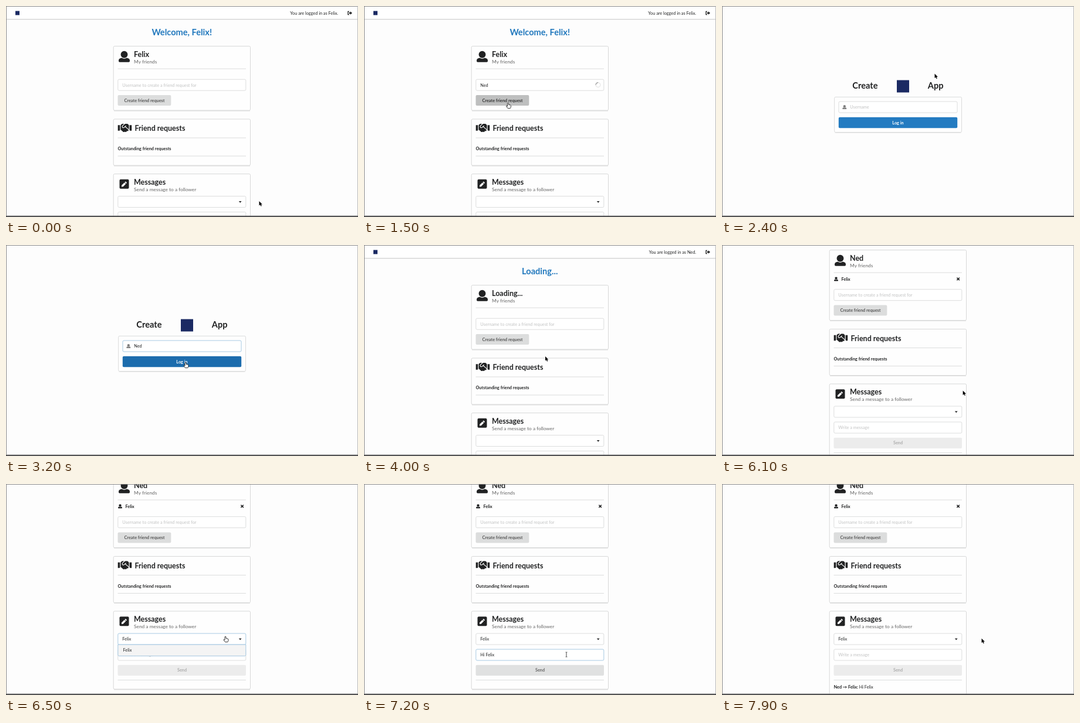
Animation, 600 px wide and 360 px high, one loop 8000 ms. Source, as an HTML page with a canvas:

```html
<!DOCTYPE html>
<html lang="en">
<head>
<meta charset="utf-8">
<title>Friends app</title>
<style>
  html, body { margin: 0; width: 100%; height: 100%; overflow: hidden; background: #fdfdfd; }
  canvas { display: block; }
</style>
</head>
<body>
<canvas id="stage" width="600" height="360"></canvas>
<script>
const ctx = document.getElementById('stage').getContext('2d');
const LOOP = 8000, TICK = 100;
const FRIEND = 'Felix', USER = 'Ned';
const INK = '#212223', GREY = '#666', FAINT = '#c2c3c3', LINE = '#dcdddd';
const BLUE = '#2178bd', FOCUS = '#9cc3df', NAVY = '#1b2a63';
const SMALL = 7.3, SUB = 8.35, HEAD = 12.5, TITLE = 14.6;
const ROW = 10.5;

const userIcon = new Path2D('M256 0A160 160 0 0 1 256 320A160 160 0 0 1 256 0ZM439 334L368 316Q256 390 144 316L73 334Q0 355 0 427V464Q0 512 48 512H464Q512 512 512 464V427Q512 355 439 334Z');
const cuffs = new Path2D('M0 128H96V352Q96 384 64 384H0ZM544 128H640V384H576Q544 384 544 352Z');
const rightHand = new Path2D('M435 64H349Q337 64 327 72L229 162Q208 190 227 219Q253 242 283 221L363 148Q380 140 386 158L359 195L512 322V128L457 73Z');
const leftHand = new Path2D('M289 64H205Q192 64 183 73L128 128V352H146L237 434Q290 470 327 424Q365 465 397 434L429 395Q460 415 480 395L490 380Q500 355 484 339L335 217L305 245Q245 285 203 241Q165 190 207 139Z');
const arrow = new Path2D('M0 0V7.6L1.8 6L3 8.7L4.3 8.1L3.1 5.6H5.4Z');
const hand = new Path2D('M-1 5V.7Q0 -.6 1 .7V3.5Q4.6 3.4 5 5L4.8 7.6L3.8 9.6H-.4L-3 6.2Q-3 4.8 -2 5.3L-1 6.3Z');

// tick, x, y, pointer shape
const pointerKeys = [
  [0, 431.5, 333, 'arrow'], [3, 330, 135, 'beam'], [6, 330, 135, 'beam'],
  [7, 285, 150, 'arrow'], [9, 245.5, 165, 'hand'], [18, 245.5, 165, 'hand'],
  [19, 330, 125, 'arrow'], [21, 586, 11, 'hand'], [22, 586, 11, 'hand'],
  [23, 490, 55, 'arrow'], [24, 362.5, 115.5, 'arrow'], [26, 300, 173, 'beam'],
  [31, 300, 173, 'beam'], [32, 306, 200, 'hand'], [33, 308, 222, 'arrow'],
  [34, 309, 202, 'hand'], [36, 309, 192, 'hand'], [37, 309, 190, 'arrow'],
  [45, 309, 190, 'arrow'], [49, 402, 254, 'hand'], [52, 402, 254, 'arrow'],
  [53, 408, 250, 'arrow'], [54, 465.5, 231, 'arrow'], [58, 465.5, 231, 'arrow'],
  [63, 374, 260, 'hand'], [67, 374, 260, 'hand'], [68, 345, 291, 'beam'],
  [72, 345, 291, 'beam'], [74, 305, 315, 'hand'], [77, 305, 315, 'hand'],
  [78, 370, 292, 'arrow'], [79, 442.5, 263.5, 'arrow']
];

const between = (v, from, to) => v >= from && v < to;

function text(str, x, y, size, color = INK, weight = 400, align = 'left') {
  ctx.font = `${weight} ${size}px Lato, sans-serif`;
  ctx.fillStyle = color;
  ctx.textAlign = align;
  ctx.fillText(str, x, y + size * 0.36);
}

const bold = (str, x, y, size, color = INK, align = 'left') => text(str, x, y, size, color, 700, align);

function box(x, y, w, h, fill, stroke, r = 2) {
  ctx.beginPath();
  ctx.roundRect(x, y, w, h, r);
  if (fill) { ctx.fillStyle = fill; ctx.fill(); }
  if (stroke) { ctx.strokeStyle = stroke; ctx.lineWidth = 0.9; ctx.stroke(); }
}

function rule(y) {
  ctx.fillStyle = LINE;
  ctx.fillRect(190.5, y - 0.5, 218.5, 1);
}

function icon(paths, x, y, scale, color = INK) {
  ctx.save();
  ctx.translate(x, y);
  ctx.scale(scale, scale);
  ctx.fillStyle = color;
  paths.forEach(p => ctx.fill(p));
  ctx.restore();
}

function poly(points, color) {
  ctx.beginPath();
  points.forEach(([x, y]) => ctx.lineTo(x, y));
  ctx.fillStyle = color;
  ctx.fill();
}

function strokeLine(points, color, width) {
  ctx.beginPath();
  points.forEach(([x, y], i) => i ? ctx.lineTo(x, y) : ctx.moveTo(x, y));
  ctx.strokeStyle = color;
  ctx.lineWidth = width;
  ctx.stroke();
}

function card(y, h) {
  ctx.fillStyle = '#e4e4e4';
  ctx.fillRect(184, y + h, 232, 1.5);
  box(183.2, y, 233.3, h, '#fefefe', '#d3d4d4');
}

function field(x, y, w, value, hint, focused, pad = 7.5) {
  box(x, y, w, 19, '#fff', focused ? FOCUS : '#d9dada');
  text(value || hint, x + pad, y + 9.7, SMALL, value ? INK : FAINT);
}

function spinner(x, y, time) {
  const start = time / 600 * Math.PI * 2;
  ctx.lineWidth = 1;
  [['#e2e2e2', 0, 7], ['#808080', start, start + 1.6]].forEach(([color, a, b]) => {
    ctx.beginPath();
    ctx.arc(x, y, 4, a, b);
    ctx.strokeStyle = color;
    ctx.stroke();
  });
}

function personRow(name, y) {
  icon([userIcon], 191, y - 3.7, 7 / 512);
  bold(name, 203.5, y, SMALL);
}

function navbar(name) {
  ctx.fillStyle = '#fff';
  ctx.fillRect(0, 0, 600, 22);
  ctx.fillStyle = '#d2d3d3';
  ctx.fillRect(0, 22, 600, 1);
  ctx.fillStyle = '#efefef';
  ctx.fillRect(0, 23, 600, 1);
  ctx.fillStyle = NAVY;
  ctx.fillRect(16, 8.5, 7, 7);
  text(`You are logged in as ${name}.`, 566, 12, SMALL, INK, 400, 'right');
  strokeLine([[585, 9.4], [582.9, 9.4], [582.9, 14.6], [585, 14.6]], INK, 1.2);
  ctx.fillStyle = INK;
  ctx.fillRect(584.6, 11, 2.6, 2);
  poly([[586.8, 9], [590, 12], [586.8, 15]], INK);
}

function profileCard(y, s) {
  const extra = s.friend ? ROW : 0;
  card(y, 109.5 + extra);
  icon([userIcon], 192, y + 8.2, 19 / 512);
  bold(s.heading, 218, y + 14, HEAD);
  text('My friends', 218, y + 26.5, SUB, GREY);
  rule(y + 38.5);
  if (s.friend) {
    personRow(FRIEND, y + 49.5);
    const cy = y + 49.3;
    strokeLine([[400.4, cy - 2.2], [404.8, cy + 2.2]], INK, 1.6);
    strokeLine([[400.4, cy + 2.2], [404.8, cy - 2.2]], INK, 1.6);
  }
  y += extra;
  field(190.8, y + 56.6, 218, s.request, 'Username to create a friend request for', s.requestFocus);
  if (s.requestBusy) spinner(399, y + 66, s.time);
  box(190.5, y + 83.3, 90.8, 18.2, s.requestHover ? '#bebfbf' : '#dcdddd');
  bold('Create friend request', 236, y + 92.4, SMALL, s.requestHover ? '#333' : '#555', 'center');
}

function requestsCard(y, pending) {
  const extra = pending ? ROW : 0;
  card(y, 79 + extra);
  icon([cuffs, leftHand, rightHand], 190.7, y + 5.6, 23.5 / 640);
  bold('Friend requests', 219.5, y + 15.7, HEAD);
  rule(y + 32);
  bold('Outstanding friend requests', 190.5, y + 50.7, SMALL);
  if (pending) {
    personRow(FRIEND, y + 63);
    icon([userIcon], 398.5, y + 60, 6 / 512);
    strokeLine([[405, y + 63], [408.5, y + 63]], INK, 1);
    strokeLine([[406.7, y + 61.2], [406.7, y + 64.8]], INK, 1);
  }
  rule(y + 63 + extra);
}

function pencilIcon(x, y) {
  box(x, y, 16, 16, INK, null, 2);
  ctx.save();
  ctx.translate(x + 3.4, y + 12.7);
  ctx.rotate(-Math.PI / 4);
  poly([[0, 0], [2.2, -1.7], [8.7, -1.7], [8.7, 1.7], [2.2, 1.7]], '#fff');
  box(9.4, -1.7, 2, 3.4, '#fff', null, 0.6);
  ctx.restore();
}

function messagesCard(y, s) {
  card(y, 133 + (s.sent ? ROW : 0));
  pencilIcon(193.5, y + 9.3);
  bold('Messages', 218, y + 13.5, HEAD);
  text('Send a message to a follower', 218, y + 26.2, SUB, GREY);
  field(190.8, y + 65, 218, s.message, 'Write a message', s.messageFocus);
  box(190.5, y + 91.8, 218.5, 18.2, s.sendHover ? '#cfd0d0' : s.message ? '#e0e1e1' : '#ececec');
  if (s.sendBusy) spinner(300, y + 101, s.time);
  else bold('Send', 300, y + 100.7, SMALL, s.message ? '#666' : '#adadad', 'center');
  rule(y + 117.5);
  if (s.sent) {
    const label = `${USER} → ${FRIEND}:`;
    bold(label, 190.5, y + 129.5, SMALL);
    const w = ctx.measureText(label + ' ').width;
    text(`Hi ${FRIEND}`, 190.5 + w, y + 129.5, SMALL);
  }
  field(190.8, y + 38, 218, s.receiver, '', s.receiverFocus);
  poly([[396.8, y + 46.6], [401.6, y + 46.6], [399.2, y + 49.2]], INK);
  if (s.menuOpen) {
    box(190.8, y + 57, 218, 19.4, '#f4f4f4', FOCUS, [0, 0, 2, 2]);
    text(FRIEND, 199.5, y + 66.7, SMALL);
  }
}

function mainPage(s) {
  ctx.save();
  ctx.translate(0, -s.scroll);
  navbar(s.login);
  bold(s.title, 299.7, 45, TITLE, BLUE, 'center');
  const friendShift = s.friend ? ROW : 0;
  profileCard(68.6, s);
  requestsCard(193 + friendShift, s.pending);
  messagesCard(286.5 + friendShift + (s.pending ? ROW : 0), s);
  ctx.restore();
}

function loginPage(k) {
  bold('Create', 222.3, 136, TITLE);
  bold('App', 350.8, 136, TITLE);
  ctx.fillStyle = NAVY;
  ctx.fillRect(298, 126.5, 21, 21);
  ctx.fillStyle = '#e4e4e4';
  ctx.fillRect(192.5, 215.5, 215, 1.2);
  box(191.7, 155.3, 216.8, 60.2, '#fefefe', '#d6d7d7');
  const typed = USER.slice(0, Math.max(0, k - 28));
  field(199, 163, 202, typed, 'Username', between(k, 27, 36), 19.3);
  icon([userIcon], 205.3, 169, 7 / 512, '#808080');
  const hover = k === 32 || between(k, 34, 37);
  box(198.8, 189.8, 202.4, 18.4, hover ? '#1c6cad' : '#237bc1');
  bold('Log in', 300, 199, SMALL, '#fff', 'center');
}

function stateAt(k, time) {
  const first = k < 23, loading = between(k, 37, 45);
  const greeting = `Hi ${FRIEND}`;
  return {
    time,
    login: first ? FRIEND : USER,
    title: loading ? 'Loading...' : `Welcome, ${first ? FRIEND : USER}!`,
    heading: loading ? 'Loading...' : first ? FRIEND : USER,
    request: k < 18 ? USER.slice(0, Math.max(0, k - 3)) : '',
    requestFocus: between(k, 3, 10),
    requestBusy: between(k, 11, 18),
    requestHover: between(k, 8, 19),
    pending: between(k, 45, 52),
    friend: k >= 55,
    scroll: 80 * Math.min(1, Math.max(0, (k - 58) / 4)),
    receiver: k >= 65 ? FRIEND : '',
    receiverFocus: between(k, 63, 68),
    menuOpen: between(k, 64, 67),
    message: k < 77 ? greeting.slice(0, Math.max(0, (k - 68) * 2)) : '',
    messageFocus: between(k, 68, 75),
    sendHover: between(k, 74, 77),
    sendBusy: between(k, 75, 77),
    sent: k >= 77
  };
}

function pointer(k) {
  const i = pointerKeys.findLastIndex(key => key[0] <= k);
  const [t0, x0, y0, shape] = pointerKeys[i];
  const [t1, x1, y1] = pointerKeys[i + 1] || [t0 + 1, x0, y0];
  const p = (k - t0) / (t1 - t0);
  ctx.save();
  ctx.translate(x0 + (x1 - x0) * p, y0 + (y1 - y0) * p);
  ctx.lineJoin = 'round';
  if (shape === 'arrow') {
    ctx.strokeStyle = '#fff';
    ctx.lineWidth = 1.2;
    ctx.stroke(arrow);
    ctx.fillStyle = '#000';
    ctx.fill(arrow);
  } else if (shape === 'hand') {
    ctx.fillStyle = '#fff';
    ctx.fill(hand);
    ctx.strokeStyle = '#222';
    ctx.lineWidth = 0.9;
    ctx.stroke(hand);
  } else {
    strokeLine([[0, -4], [0, 4]], '#333', 0.9);
    strokeLine([[-1.5, -4], [1.5, -4]], '#333', 0.7);
    strokeLine([[-1.5, 4], [1.5, 4]], '#333', 0.7);
  }
  ctx.restore();
}

function windowEdges() {
  ctx.fillStyle = '#8c8c8c';
  ctx.fillRect(0, 0, 600, 1);
  ctx.fillRect(0, 0, 1, 360);
  ctx.fillStyle = '#b8b8b8';
  ctx.fillRect(599, 0, 1, 360);
  ctx.fillStyle = '#909090';
  ctx.fillRect(0, 357.5, 600, 1);
  ctx.fillStyle = '#343436';
  ctx.fillRect(0, 358.5, 600, 1.5);
}

function draw(now) {
  const k = Math.floor((now % LOOP) / TICK);
  ctx.fillStyle = '#fdfdfd';
  ctx.fillRect(0, 0, 600, 360);
  if (between(k, 23, 37)) loginPage(k);
  else mainPage(stateAt(k, k * TICK));
  pointer(k);
  windowEdges();
}

let start;
function loop(now) {
  start ??= now;
  draw(now - start);
  requestAnimationFrame(loop);
}
requestAnimationFrame(loop);
</script>
</body>
</html>
```
